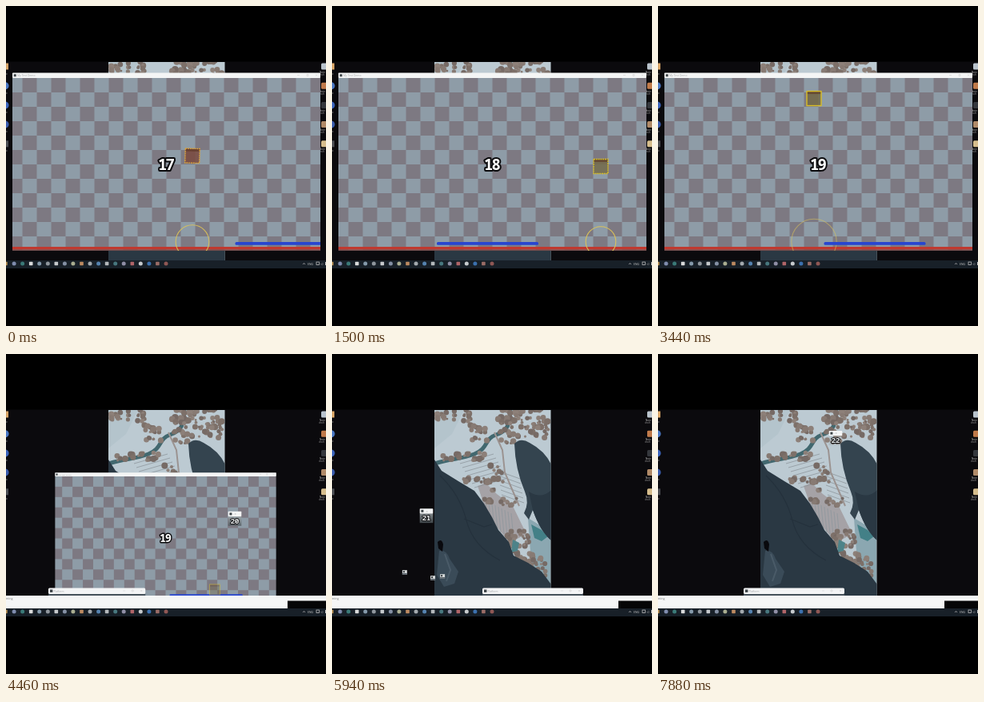
An HTML page that plays this animation: 400x400 px, repeating every 7.9 s.

```html
<!DOCTYPE html>
<html lang="en">
<head>
<meta charset="utf-8">
<title>Bouncing windows</title>
<style>
  html, body { margin: 0; width: 100%; height: 100%; overflow: hidden; background: #000; }
  svg { display: block; width: 100vw; height: 100vh; }
  text { font-family: "Open Sans", "Liberation Sans", sans-serif; }
  .score { font: bold 19px "Noto Sans Mono", "DejaVu Sans Mono", monospace; letter-spacing: -1.8px; fill: #fff;
    stroke: #0b0b0d; stroke-width: 4; stroke-linejoin: round; paint-order: stroke; text-anchor: middle; }
  .score.small { font-size: 9.5px; letter-spacing: -.6px; stroke-width: 1.8; fill: #e8ebec; }
</style>
</head>
<body>
<svg id="stage" viewBox="0 0 400 400"></svg>
<script>
const LOOP = 7900;
const BREAKOUT = 3; // index of the bounce at which the ball leaves its window
const bounces = [-265, 1280, 2810, 4282, 5750, 7237, 8777];
const landings = [233, 336, 195, 286, 118, 222, 170];
const paddles = [350, 194.5, 271, 113.6, 251, 170];
const FLOOR = 287, RISE = 175, MINI_FLOOR = 276, MINI_RISE = 185;

let seed = 11;
const random = () => (seed = (seed * 16807) % 2147483647) / 2147483647;
const clamp = v => Math.max(0, Math.min(1, v));
const smooth = v => { v = clamp(v); return v * v * (3 - 2 * v); };
const mix = (a, b, k) => a + (b - a) * k;
const arc = u => 4 * u * (1 - u);
const rect = (x, y, w, h, fill, more = '') =>
  `<rect x="${x}" y="${y}" width="${w}" height="${h}" fill="${fill}" ${more}/>`;
const circle = (x, y, r, fill, more = '') => `<circle cx="${x}" cy="${y}" r="${r}" fill="${fill}" ${more}/>`;
const path = (d, fill, more = '') => `<path d="${d}" fill="${fill}" ${more}/>`;
const label = (x, y, size, fill, text) => `<text x="${x}" y="${y}" font-size="${size}" fill="${fill}">${text}</text>`;

function grove(x, y, spreadX, spreadY, count) {
  const shades = ['#7d7069', '#877a73', '#8d8079', '#766a65'];
  let out = '';
  for (let i = 0; i < count; i++) {
    const px = x + (random() - .5) * spreadX, py = y + (random() - .5) * spreadY;
    out += circle(px.toFixed(1), py.toFixed(1), (1.4 + random() * 2.8).toFixed(1), shades[i % 4]);
  }
  return out;
}

function stripes(x, y, dx, dy, stepX, stepY, count) {
  let d = '';
  for (let i = 0; i < count; i++) d += `M${x + i * stepX} ${y + i * stepY}l${dx} ${dy}`;
  return path(d, 'none', 'stroke="#8f979e" stroke-width=".8"');
}

function wallpaper() {
  return `<g clip-path="url(#picture)">` +
    rect(128, 70, 146, 250, '#bccad2') +
    path('M128 70H165L150 100L128 118Z', '#b4c4cc') +
    path('M182 165L192 161L206 175L226 190L243 225L222 236L205 215L190 188Z', '#a5a2a6') +
    stripes(160, 137, 42, -12, 3, 5, 7) +
    stripes(192, 183, 3, 32, 4, 2, 9) +
    stripes(207, 146, 28, 10, 1, 6, 6) +
    path('M245 205L273 222V290L250 275Z', '#8ba7b1') +
    path('M128 137C150 130 160 132 178 125S190 106 205 101S222 88 223 70', 'none', 'stroke="#42686f" stroke-width="5"') +
    path('M203 98L213 120L216 148L234 190', 'none', 'stroke="#9b9391" stroke-width="2"') +
    grove(152, 77, 42, 14, 24) + grove(183, 98, 22, 20, 18) + grove(238, 80, 64, 22, 46) +
    grove(221, 98, 24, 30, 18) + grove(256, 98, 34, 14, 16) + grove(163, 128, 56, 10, 18) +
    grove(187, 157, 46, 7, 14) + grove(206, 150, 16, 24, 10) + grove(222, 185, 26, 10, 10) +
    grove(197, 178, 14, 22, 8) + grove(234, 242, 34, 46, 44) + grove(256, 267, 30, 28, 22) +
    path('M249 213L262 220L270 228L262 234L253 230Z', '#438087') +
    path('M226 232l8 4l-2 10l-8 2Z', '#4d8389') +
    path('M228 112Q236 104 247 111Q266 121 274 138V233Q260 221 251 195L246 207L240 199Q247 186 241 172Q229 144 228 112Z', '#34444f') +
    path('M246 172Q262 182 274 170V233Q260 221 251 195Z', '#2a3843') +
    path('M128 132L137 146L158 159L178 171L190 187L200 204L208 220L221 235L227 252L245 261L262 272L274 288V320H128Z', '#2a3843') +
    path('M135 152Q160 176 168 208T210 258M165 206l25 10l10 -3', 'none', 'stroke="#24313c" stroke-width="1.2"') +
    path('M134 246Q143 244 147 256L158 272L153 287L140 291L131 276Z', '#3a4b58') +
    path('M141 250l7 20l-5 14', 'none', 'stroke="#4a5b68" stroke-width="2"') +
    path('M132 235Q137 230 139 238L138 247L133 243Z', '#09090d') + `</g>`;
}

function desktopIcons() {
  const left = ['#d8a465', '#4a78c4', '#3c65bd', '#3a5cae', '#4b4d52'];
  const right = ['#b9c3cc', '#c07a4a', '#35383d', '#b08a68', '#d6bd8c'];
  return left.map((c, i) => {
    const y = 75.5 + i * 24.2;
    return (i % 4 ? circle(-1, y, 4.6, c) : rect(-4, y - 4, 7, 8, c)) + label(-3, y + 10, 3, '#aaa', 'abc');
  }).join('') + right.map((c, i) => {
    const y = 75.5 + i * 24.2;
    return rect(394, y - 4, 8, 8, c, 'rx="1.5"') + label(392, y + 8, 3, '#bbb', 'Note') +
      label(391, y + 11, 3, '#999', 'draft');
  }).join('');
}

function taskbar() {
  const tints = ['#b58d50', '#7f8cae', '#3a7a78', '#d8dada', '#8499aa', '#8f969d', '#c5c9cc',
    '#8490a4', '#a9ad90', '#bd8a60', '#a3a9ae', '#5583b0', '#b4b8bb', '#47777e', '#8f8ea5',
    '#b06468', '#c6cacd', '#3b70ae', '#9a6c66', '#8f5754'];
  return rect(0, 318, 400, 10, '#182028') + tints.map((c, i) => {
    const x = (-.5 + i * 10.55).toFixed(1);
    return i % 3 ? circle(x, 322, 2.5, c) : rect(x - 2.3, 319.7, 4.6, 4.6, c, 'rx=".7"');
  }).join('') + path('M371 323l1.5 -1.5l1.5 1.5', 'none', 'stroke="#ccc" stroke-width=".7"') +
    label(377, 323.5, 3.4, '#ccc', 'ENG') + rect(388, 320, 3.5, 3.5, 'none', 'stroke="#bbb" stroke-width=".8"') +
    label(393, 323.5, 4, '#ccc', '&lt;)') + rect(399, 320, 1, 4, '#ccc');
}

const titleBar = (x, y, w, h, title) =>
  rect(x, y, w, h, '#f4f5f5', 'rx=".8"') + rect(x + 1.7, y + h / 2 - 1.5, 3, 3, '#3d4448') +
  label(x + 6, y + h / 2 + 1.3, 3.4, '#a5a7a9', title);

const stage = document.getElementById('stage');
stage.innerHTML = `
  <defs>
    <clipPath id="picture">${rect(128, 70, 145.5, 248, '#000')}</clipPath>
    <clipPath id="field">${rect(8, 90, 385, 216, '#000')}</clipPath>
    <pattern id="checker" x="200.5" y="198" width="36" height="36" patternUnits="userSpaceOnUse">
      ${rect(0, 0, 36, 36, '#8e9ca7')}${rect(0, 0, 18, 18, '#7d7982')}${rect(18, 18, 18, 18, '#7d7982')}
    </pattern>
    <linearGradient id="glass" x2="0" y2="1"><stop stop-color="#a4adb0"/><stop offset="1" stop-color="#4d565a"/></linearGradient>
  </defs>
  ${rect(0, 0, 400, 400, '#000')}${rect(0, 69.5, 400, 249, '#0b0a0d')}
  ${wallpaper()}${desktopIcons()}
  <g id="game">
    ${titleBar(8, 83.5, 385, 6.5, 'My Test Demo')}
    ${path('M364 86.5h3M376 85.5h2v2h-2zM387 85.5l2 2m0 -2l-2 2', 'none', 'stroke="#ccc" stroke-width=".5"')}
    <g clip-path="url(#field)">
      ${rect(8, 90, 385, 216, 'url(#checker)')}
      ${rect(8, 301, 385, 3.6, '#c0392f')}${rect(8, 304.6, 385, 1.4, '#6f4a4a')}
      <circle id="ripple" cy="294.5" fill="none" stroke="#dfc557" stroke-width="1.1"/>
      <g id="trail"></g>
      <rect id="paddle" y="295" width="127" height="3.8" rx="1.5" fill="#2745d0"/>
      <g id="ball">
        <rect id="ballFill" x="-9" y="-9" width="18" height="18"/>
        ${rect(-9, -9, 18, 3.5, '#5d3520', 'opacity=".6"')}
        <rect id="ballEdge" x="-9" y="-9" width="18" height="18" fill="none" stroke-width="1.4"/>
      </g>
      <text id="score" class="score" x="199.6" y="204.8"></text>
    </g>
  </g>
  <g id="desktopGame">
    <g id="sparks"></g>
    <g id="paddleWindow">
      <rect id="paddleBar" y="292.5" height="7.5" rx="1.5" fill="#f3f4f5"/>
      <rect id="paddleBody" y="300" height="2" fill="#45515a"/>
      ${rect(2, 294.5, 3.4, 3.4, '#3d4448')}${label(6.5, 297.5, 3.2, '#a3a5a7', 'Platform')}
      <path id="paddleButtons" d="M-28 296h3M-17 295h2v2h-2zM-6 295l2 2m0 -2l-2 2" fill="none" stroke="#ccc" stroke-width=".5"/>
    </g>
    <g id="mini">
      <rect id="miniBody" x="-8.3" y="6" width="16.6" height="12" fill="url(#glass)"/>
      ${titleBar(-8.3, 0, 16.6, 6.3, '- x')}
      <text id="miniScore" class="score small" x="-.3" y="15.2"></text>
    </g>
    ${rect(0, 302, 400, 16, '#f5f6f6')}${label(0, 306.8, 3.6, '#777', 'ming')}
    <rect id="patch" y="308.5" width="62" height="9.5" fill="#050506"/>
  </g>
  ${taskbar()}${rect(0, 328, 400, 72, '#000')}`;

const parts = {};
stage.querySelectorAll('g[id], rect[id], circle[id], text[id], path[id]').forEach(e => parts[e.id] = e);
const set = (name, attrs) => { for (const k in attrs) parts[name].setAttribute(k, attrs[k]); };
const show = (name, on) => set(name, { display: on ? 'inline' : 'none' });

// The ball rises straight up, then darts sideways after its peak.
const acrossAt = (k, u) => mix(landings[k], landings[k + 1], smooth((u - .45) / .25));

function drawGame(k, age, u, span, sinceBreakout) {
  const out = k >= BREAKOUT;
  const shrink = out ? sinceBreakout / 178 : 0;
  show('game', shrink < 3.2);
  set('game', { transform: `translate(${200.5 - Math.min(1, shrink)} ${195 + 33 * shrink * shrink}) ` +
    `scale(${Math.max(.05, 1 - .28 * shrink)}) translate(-200.5 -195)` });

  const i = Math.min(k, BREAKOUT - 1);
  const x = out ? landings[BREAKOUT] : acrossAt(k, u);
  const y = out ? FLOOR : FLOOR - RISE * arc(u);
  const tilt = k === 0 ? 3 * clamp(1 - age / 600) : 0;
  set('ball', { transform: `translate(${x} ${y}) rotate(${tilt})`, opacity: clamp(1 - shrink / 2) });
  set('ballFill', { fill: k === 0 ? '#7a4a40' : '#746a49', opacity: .85 });
  set('ballEdge', { stroke: k === 0 ? '#d9a23e' : '#d8bd26', 'stroke-dasharray': !out && age < 400 ? '2 .8' : 'none' });
  parts.score.textContent = 17 + i;

  const from = i ? paddles[i - 1] : 233;
  set('paddle', { x: (out ? paddles[i] : mix(from, paddles[i], smooth(age / 200))) - 63.5 });

  show('ripple', !out && age < 760);
  set('ripple', { cx: x, r: 30 * (1 - Math.exp(-age / 225)), opacity: clamp(1.15 - age / 1000) });

  parts.trail.innerHTML = out ? '' : [.5, .57, .64].map(v => {
    const life = (u - v) * span / 300;
    if (life < 0 || life > 1) return '';
    return rect(acrossAt(k, v) - 4, FLOOR - RISE * arc(v) - 2, 5, 5, '#a3a052', `opacity="${.9 - life * .5}"`);
  }).join('');
}

function drawDesktopGame(k, age, u, sinceBreakout) {
  const on = k >= BREAKOUT;
  show('desktopGame', on);
  if (!on) return;
  const grow = clamp(sinceBreakout / 270);
  const width = 112 + 14 * grow;
  const cx = k === BREAKOUT ? paddles[k] : mix(paddles[k - 1], paddles[k], smooth(age / 190));
  set('paddleWindow', { transform: `translate(${cx - width / 2} 0)` });
  set('paddleBar', { width });
  set('paddleBody', { width });
  set('paddleButtons', { transform: `translate(${width} 0)` });
  set('patch', { x: 340 + 18 * grow });

  set('mini', { transform: `translate(${acrossAt(k, u)} ${MINI_FLOOR - MINI_RISE * arc(u)})` });
  set('miniBody', { opacity: clamp(1.05 - age / 700) });
  parts.miniScore.textContent = 17 + k;

  const s = age / 190;
  parts.sparks.innerHTML = k > BREAKOUT && age < 450 ? [[-27, 14], [8, 7], [20, 9]].map(([dx, up]) => {
    const x = landings[k] + dx * s, y = 287 - up * s * (1.6 - .6 * s);
    return rect(x - 3, y - 2.8, 6, 5.6, '#d5d8d9') + rect(x - 2, y - 1.8, 2, 2, '#33383b') + rect(x - 3, y + 1, 6, 1.8, '#596269');
  }).join('') : '';
}

function draw(now) {
  let k = 0;
  while (now >= bounces[k + 1]) k++;
  const age = now - bounces[k], span = bounces[k + 1] - bounces[k], u = age / span;
  const sinceBreakout = now - bounces[BREAKOUT];
  drawGame(k, age, u, span, sinceBreakout);
  drawDesktopGame(k, age, u, sinceBreakout);
}

const start = performance.now();
function frame() {
  draw((performance.now() - start) % LOOP);
  requestAnimationFrame(frame);
}
frame();
</script>
</body>
</html>
```
